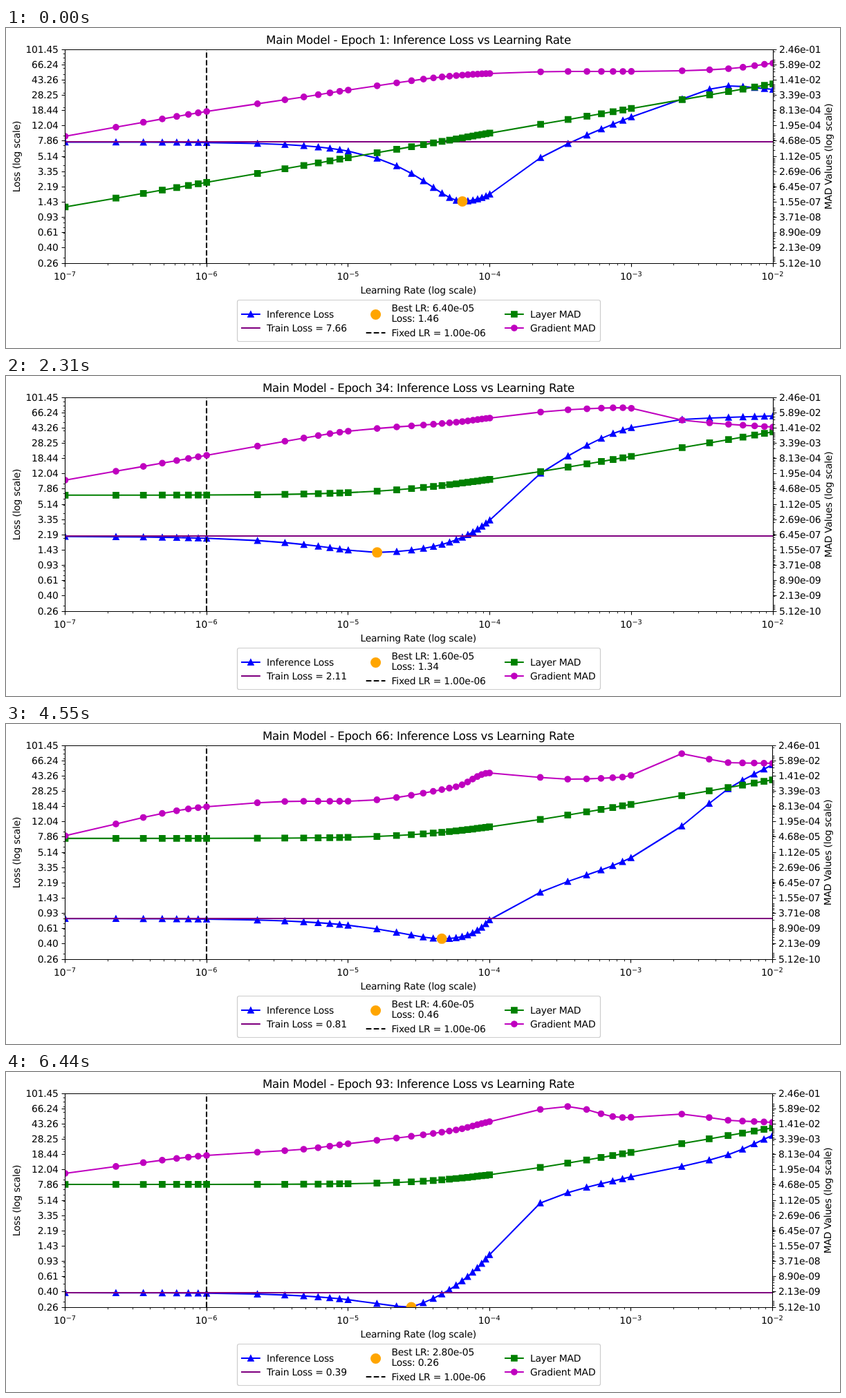
Write an HTML page that moves like this. It is 1206 px wide and 464 px high and loops after 6.51 s.

```html
<!DOCTYPE html>
<html lang="en">
<head>
<meta charset="utf-8">
<title>Inference Loss vs Learning Rate</title>
<style>
  html, body { margin: 0; width: 100%; height: 100%; overflow: hidden; background: #fff; }
  svg { display: block; width: 1206px; height: 464px; }
  text {
    font: 13.89px "DejaVu Sans", sans-serif; letter-spacing: -0.0155em;
    text-rendering: geometricPrecision; fill: #000; white-space: pre;
  }
  .title { font-size: 16.67px; }
  .sup { font-size: 9.72px; }
  .line { fill: none; stroke-width: 2.08; stroke-linejoin: round; }
</style>
</head>
<body>
<script>
const NS = 'http://www.w3.org/2000/svg';
const LEFT = 85.5, TOP = 31.2, HEIGHT = 309.8, BOTTOM = TOP + HEIGHT;
const STEP = 70, EPOCHS = 93, TICKS = 14;
const BLUE = '#0000ff', PURPLE = '#800080', GREEN = '#008000', MAGENTA = '#bf00bf', ORANGE = '#ffa500';
const DASH = '7.7 3.33';

const snap = v => Math.floor(v) + 0.5;
const mix = (a, b, k) => a + (b - a) * k;

// Log axis running from max downwards, shrinking by ratio at each tick
function logAxis(max, ratio) {
  const min = max * ratio ** TICKS;
  return {
    min, max,
    tick: i => max * ratio ** i,
    y: v => TOP + HEIGHT * Math.log(max / v) / Math.log(max / min)
  };
}
const lossAxis = logAxis(101.446, 0.65299);
const madAxis = logAxis(0.2457, 0.23984);
const sci = v => v.toExponential(2).replace(/-(\d)$/, '-0$1');

// Learning rates: evenly spaced within each decade, denser around 1e-5
const rates = [1e-7];
for (let exp = -7; exp < -2; exp++) {
  const n = exp === -5 ? 15 : 7;
  for (let i = 1; i <= n; i++) rates.push((1 + 9 * i / n) * 10 ** exp);
}
const logs = rates.map(Math.log10);

// Monotone cubic through a few points
function curve(xs, ys) {
  const slope = xs.slice(1).map((x, i) => (ys[i + 1] - ys[i]) / (x - xs[i]));
  const tangent = xs.map((_, i) => {
    if (i === 0) return slope[0];
    if (i === xs.length - 1) return slope[i - 1];
    const a = slope[i - 1], b = slope[i];
    return a * b > 0 ? 2 * a * b / (a + b) : 0;
  });
  return x => {
    let i = 0;
    while (i < xs.length - 2 && xs[i + 1] < x) i++;
    const h = xs[i + 1] - xs[i], t = (x - xs[i]) / h, s = t * t * (3 - 2 * t);
    return mix(ys[i], ys[i + 1], s) +
      h * t * (1 - t) * (tangent[i] * (1 - t) - tangent[i + 1] * t);
  };
}

// Bend points shared by all epochs, as positions in rates
const climbAt = [29, 30, 36, 37, 39, 43].map(i => logs[i]);
const gradAt = [0, 7, 10, 14, 22, 29, 31, 35, 37, 39, 43].map(i => logs[i]);

// dip, rise: exponents of the loss curve before and after its minimum
const keys = [
  { epoch: 1, train: 7.66, best: 1.46, rate: 6.4e-5, dip: 1.25, rise: 1.6,
    climb: [241, 188, 129, 103, 84, 89], grad: [157, 121, 100, 90, 69, 66, 63, 63, 62, 59, 51] },
  { epoch: 20, train: 4.24, best: 1.41, rate: 3.4e-5, dip: 1, rise: 1.35,
    climb: [218, 157, 93, 69, 59, 58], grad: [165, 129, 105, 93, 69, 61, 55, 52, 54, 67, 70] },
  { epoch: 34, train: 2.11, best: 1.34, rate: 1.6e-5, dip: 0.9, rise: 1.35,
    climb: [209, 141, 75, 63, 60, 58], grad: [151, 115, 90, 80, 67, 61, 49, 46, 64, 70, 74] },
  { epoch: 53, train: 1.08, best: 0.52, rate: 7e-5, dip: 0.93, rise: 2,
    climb: [297, 250, 204, 121, 71, 45], grad: [160, 126, 109, 111, 100, 85, 79, 81, 54, 57, 59] },
  { epoch: 66, train: 0.81, best: 0.46, rate: 4.6e-5, dip: 1, rise: 2,
    climb: [284, 244, 194, 148, 94, 59], grad: [162, 120, 112, 112, 91, 71, 80, 77, 43, 56, 57] },
  { epoch: 79, train: 0.59, best: 0.39, rate: 2.8e-5, dip: 1.1, rise: 1.15,
    climb: [273, 217, 140, 114, 93, 68], grad: [146, 119, 112, 111, 87, 72, 71, 68, 62, 69, 71] },
  { epoch: 93, train: 0.39, best: 0.26, rate: 2.8e-5, dip: 1.1, rise: 1,
    climb: [265, 190, 152, 137, 120, 92], grad: [147, 121, 112, 104, 84, 72, 50, 66, 61, 70, 73] }
];

// Parameters at one epoch, blended between the two nearest keys
function stateAt(epoch) {
  const i = Math.max(1, keys.findIndex(k => k.epoch >= epoch));
  const a = keys[i - 1], b = keys[i], k = (epoch - a.epoch) / (b.epoch - a.epoch);
  const lin = name => mix(a[name], b[name], k);
  const geo = name => a[name] * (b[name] / a[name]) ** k;
  const list = name => a[name].map((v, j) => mix(v, b[name][j], k));
  const goal = Math.log(geo('rate'));
  const off = r => Math.abs(Math.log(r) - goal);
  return {
    train: geo('train'), best: geo('best'), dip: lin('dip'), rise: lin('rise'),
    climb: list('climb'), grad: list('grad'),
    low: rates.reduce((m, r, j) => off(r) < off(rates[m]) ? j : m, 0)
  };
}

function lossCurve(s) {
  const start = lossAxis.y(s.train), bottom = lossAxis.y(s.best), rate = rates[s.low];
  const climb = curve(climbAt, s.climb);
  return rates.map((r, i) => {
    if (i <= s.low) return mix(start, bottom, Math.sin(Math.PI / 2 * (r / rate) ** s.dip));
    if (logs[i] < climbAt[0]) return mix(bottom, s.climb[0], ((r - rate) / (1e-4 - rate)) ** s.rise);
    return climb(logs[i]);
  });
}

// Layer MAD: proportional to the rate, above a floor that grows with training
function layerCurve(epoch) {
  const n = epoch - 1, floor = 1e-5 * n / (9.02 + 0.1 * n), p = 1 + n / 200;
  return rates.map(r => 81 - 35.7 * (2 + Math.log10(r ** p + floor ** p) / p));
}

function set(node, attrs) {
  for (const name in attrs) node.setAttribute(name, attrs[name]);
}
function add(parent, tag, attrs = {}, content = '') {
  const node = document.createElementNS(NS, tag);
  set(node, attrs);
  node.textContent = content;
  return parent.appendChild(node);
}

const shapes = {
  triangle: (x, y) => `M${x} ${y - 4.17}l4.17 8.33h-8.34z`,
  square: (x, y) => `M${x - 4.17} ${y - 4.17}h8.34v8.34h-8.34z`,
  circle: (x, y) => `M${x - 4.17} ${y}a4.17 4.17 0 1 0 8.34 0a4.17 4.17 0 1 0 -8.34 0z`
};
function series(parent, color, shape) {
  const line = add(parent, 'path', { class: 'line', stroke: color });
  const dots = add(parent, 'path', { fill: color, stroke: color, 'stroke-width': 1.39 });
  return (xs, ys) => {
    const pts = xs.map((x, i) => [+x.toFixed(2), +ys[i].toFixed(2)]);
    set(line, { d: 'M' + pts.map(p => p.join(' ')).join('L') });
    set(dots, { d: pts.map(p => shapes[shape](...p)).join('') });
  };
}

const svg = add(document.body, 'svg', { viewBox: '0 0 1206 464' });
const clipBox = add(add(svg, 'defs'), 'clipPath', { id: 'area' });
const clip = add(clipBox, 'rect', { x: LEFT, y: TOP, height: HEIGHT });
const plot = add(svg, 'g', { 'clip-path': 'url(#area)' });
const drawLoss = series(plot, BLUE, 'triangle');
const trainLine = add(plot, 'path', { class: 'line', stroke: PURPLE });
const fixedLine = add(plot, 'path', { class: 'line', stroke: '#000', 'stroke-dasharray': DASH });
const bestDot = add(plot, 'circle', { r: 7.5, fill: ORANGE });
const drawLayer = series(plot, GREEN, 'square');
const drawGrad = series(plot, MAGENTA, 'circle');

// Axes
const major = add(svg, 'path', { fill: 'none', stroke: '#000', 'stroke-width': 1.11 });
const minor = add(svg, 'path', { fill: 'none', stroke: '#000', 'stroke-width': 0.83 });
const label = (x, y, str, anchor = 'start', cls = '') =>
  add(svg, 'text', { x, y, 'text-anchor': anchor, class: cls }, str);
const turn = (x, y) => ({ transform: `translate(${x} ${y}) rotate(-90)` });
const upright = (x, y, str) => add(svg, 'text', { ...turn(x, y), 'text-anchor': 'middle' }, str);

const tickY = i => snap(TOP + HEIGHT * i / TICKS);
const madLabels = [];
for (let i = 0; i <= TICKS; i++) {
  label(75.7, tickY(i) + 4.5, lossAxis.tick(i).toFixed(2), 'end');
  madLabels.push(label(0, tickY(i) + 4.5, sci(madAxis.tick(i))));
}
const powers = [7, 6, 5, 4, 3, 2].map(e => [label(0, 365, '10'), label(0, 360, '\u2212' + e, 'start', 'sup')]);
const title = label(596.5, 23, '', 'middle', 'title');
label(596.2, 385, 'Learning Rate (log scale)', 'middle');
upright(20, 186.5, 'Loss (log scale)');
const madName = upright(0, 186.5, 'MAD Values (log scale)');

function minorTicks({ min, max, y }, x, length) {
  let d = '';
  for (let e = Math.floor(Math.log10(min)); e <= Math.log10(max); e++)
    for (let m = 2; m < 10; m++) {
      const v = m * 10 ** e;
      if (v >= min && v <= max) d += `M${x} ${snap(y(v))}h${length}`;
    }
  return d;
}

function drawAxes(right) {
  const edge = snap(right), unit = (right - LEFT) / 5, floor = snap(BOTTOM);
  let big = `M${LEFT} ${snap(TOP)}H${edge}V${floor}H${LEFT}Z`;
  let small = minorTicks(lossAxis, LEFT, -2.8) + minorTicks(madAxis, edge, 2.8);
  for (let i = 0; i <= TICKS; i++) big += `M${LEFT} ${tickY(i)}h-4.9M${edge} ${tickY(i)}h4.9`;
  powers.forEach(([base, sup], d) => {
    const x = LEFT + d * unit;
    big += `M${snap(x)} ${floor}v4.9`;
    for (let m = 2; m < 10 && d < 5; m++) small += `M${snap(x + Math.log10(m) * unit)} ${floor}v2.8`;
    set(base, { x: x - 16.4 });
    set(sup, { x: x + 1.3 });
  });
  set(major, { d: big });
  set(minor, { d: small });
  set(clip, { width: edge - LEFT });
  set(fixedLine, { d: `M${Math.round(LEFT + unit)} ${BOTTOM}V${TOP}` });
  madLabels.forEach(n => set(n, { x: Math.floor(right + 9) }));
  set(madName, turn(Math.floor(right + 85), 186.5));
}

// Legend
add(svg, 'rect', { x: 334.5, y: 394.5, width: 525, height: 60, rx: 2.8, fill: '#fff', stroke: '#ccc', 'stroke-width': 1.2 });
const sample = (x, y, color, dash = 'none') =>
  add(svg, 'path', { class: 'line', d: `M${x} ${y}h27.8`, stroke: color, 'stroke-dasharray': dash });
function entry(x, y, color, shape, str) {
  sample(x, y, color);
  if (shape) series(svg, color, shape)([x + 13.9], [y]);
  return label(x + 37, Math.round(y + 4.6), str);
}
entry(340, 415, BLUE, 'triangle', 'Inference Loss');
const trainText = entry(340, 435, PURPLE, null, '');
add(svg, 'circle', { cx: 534.6, cy: 415.5, r: 7.5, fill: ORANGE });
const rateText = label(557.5, 411, '');
const bestText = label(557.5, 426, '');
sample(520.7, 442, '#000', DASH);
label(557.5, 447, 'Fixed LR = 1.00e-06');
entry(721, 415, GREEN, 'square', 'Layer MAD');
entry(721, 435, MAGENTA, 'circle', 'Gradient MAD');

function draw(epoch) {
  const s = stateAt(epoch);
  const right = epoch < 38 ? 1109 : 1108.3;
  const xs = logs.map(v => LEFT + (v + 7) / 5 * (right - LEFT));
  const loss = lossCurve(s);
  drawAxes(right);
  drawLoss(xs, loss);
  drawLayer(xs, layerCurve(epoch));
  drawGrad(xs, logs.map(curve(gradAt, s.grad)));
  set(trainLine, { d: `M${LEFT} ${Math.round(lossAxis.y(s.train))}H${right + 1}` });
  set(bestDot, { cx: xs[s.low], cy: loss[s.low] });
  title.textContent = `Main Model - Epoch ${epoch}: Inference Loss vs Learning Rate`;
  trainText.textContent = `Train Loss = ${s.train.toFixed(2)}`;
  rateText.textContent = `Best LR: ${sci(rates[s.low])}`;
  bestText.textContent = `Loss: ${s.best.toFixed(2)}`;
}

let shown = 0;
function tick() {
  const epoch = Math.floor(performance.now() / STEP) % EPOCHS + 1;
  if (epoch !== shown) draw(shown = epoch);
  requestAnimationFrame(tick);
}
tick();
</script>
</body>
</html>
```
